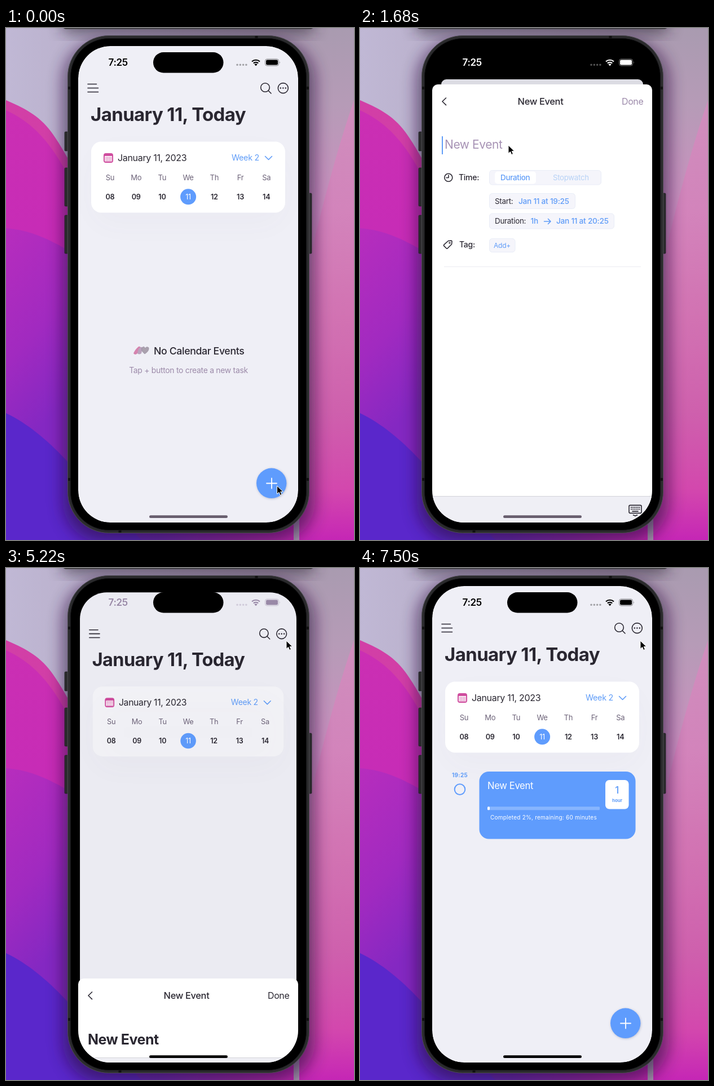
An HTML page that plays this animation: 617 px wide and 908 px high, repeating every 7560 ms.

```html
<!DOCTYPE html>
<html lang="en">
<head>
<meta charset="utf-8">
<title>Calendar: new event</title>
<style>
  html, body { margin: 0; width: 100%; height: 100%; overflow: hidden; background: #000; }
  svg { display: block; width: 100%; height: 100%; }
  text { font-family: Inter, Roboto, "Liberation Sans", sans-serif; letter-spacing: -.02em; fill: #2a2731; }
  .mid { text-anchor: middle; }
  .line { fill: none; stroke: #2a2731; stroke-width: 1.6; stroke-linecap: round; stroke-linejoin: round; }
  .pill { fill: #f5f5fb; stroke: #e9edf7; }
  .m { font-weight: 500; }
  text.blue { fill: #5f9cf8; }
  text.white { fill: #fff; }
  #typed { white-space: pre; }
</style>
</head>
<body>
<svg viewBox="0 0 617 908">
  <defs>
    <linearGradient id="sky"><stop stop-color="#c0b8d5"/><stop offset=".84" stop-color="#a99bb0"/></linearGradient>
    <linearGradient id="right" x2="0" y2="1">
      <stop stop-color="#a99bb0"/><stop offset=".15" stop-color="#b69bb7"/><stop offset=".36" stop-color="#cb8fbf"/>
      <stop offset=".52" stop-color="#cd79b4"/><stop offset=".75" stop-color="#cc60ab"/>
      <stop offset=".9" stop-color="#d346ad"/><stop offset="1" stop-color="#c526b5"/>
    </linearGradient>
    <linearGradient id="ray" x2="0" y2="1">
      <stop stop-color="#d98ac0" stop-opacity=".75"/><stop offset=".5" stop-color="#d670b2" stop-opacity=".5"/>
      <stop offset="1" stop-color="#d24ab0" stop-opacity="0"/>
    </linearGradient>
    <linearGradient id="wave" x2="0" y2="1"><stop stop-color="#d23fa6"/><stop offset="1" stop-color="#cf35b0"/></linearGradient>
    <linearGradient id="deep" x2="0" y2="1"><stop stop-color="#cb2fb3"/><stop offset=".35" stop-color="#c62bb7"/><stop offset="1" stop-color="#a22cc0"/></linearGradient>
    <linearGradient id="violet" x2=".3" y2="1"><stop stop-color="#b72dbd"/><stop offset=".4" stop-color="#a12ac0"/><stop offset=".7" stop-color="#8428c2"/></linearGradient>
    <linearGradient id="floor"><stop stop-color="#5827cb"/><stop offset=".4" stop-color="#6a28b4"/><stop offset=".75" stop-color="#9c25a9"/><stop offset="1" stop-color="#c926b4"/></linearGradient>
    <filter id="blur" x="-30%" y="-30%" width="160%" height="160%"><feGaussianBlur stdDeviation="14"/></filter>
    <filter id="wide" x="-30%" y="-60%" width="160%" height="220%"><feGaussianBlur stdDeviation="24"/></filter>
    <filter id="near" x="-30%" y="-30%" width="160%" height="160%"><feGaussianBlur stdDeviation="2"/></filter>
    <clipPath id="screen"><rect x="128" y="32" width="390" height="845" rx="57"/></clipPath>
  </defs>

  <!-- wallpaper -->
  <rect width="617" height="908" fill="url(#sky)"/>
  <rect x="520" width="97" height="908" fill="url(#right)"/>
  <path d="M617 128Q580 235 542 395V908H617Z" fill="url(#ray)"/>
  <path d="M0 128C30 141 58 154 80 184S112 238 150 300V908H0Z" fill="url(#wave)"/>
  <path d="M0 146C40 164 75 195 108 258L150 330V908H0Z" fill="url(#deep)"/>
  <path d="M0 355C40 358 80 372 150 420V908H0Z" fill="url(#violet)"/>
  <rect x="110" y="880" width="400" height="28" fill="url(#floor)"/>
  <path d="M0 683C40 702 78 735 110 770L240 908H0Z" fill="#5a27cb"/>
  <rect x="101" y="-40" width="444" height="48" fill="#2a2430" opacity=".65" filter="url(#blur)"/>
  <rect x="101" y="-10" width="444" height="12" rx="5" fill="#454348"/>
  <rect x="101" y="22" width="447" height="890" rx="72" fill="#2b0a3c" opacity=".6" filter="url(#blur)"/>

  <!-- phone -->
  <g fill="#2b2b2d" stroke="#17171a" stroke-width=".6">
    <rect x="104" y="184" width="8" height="34" rx="1.5"/>
    <rect x="104" y="248" width="8" height="68" rx="1.5"/>
    <rect x="104" y="332" width="8" height="68" rx="1.5"/>
    <rect x="534" y="293" width="8" height="107" rx="1.5"/>
  </g>
  <rect x="109.5" y="13.5" width="428" height="882" rx="73" fill="#2a2a2c" stroke="#4c4b50"/>
  <path d="M110 106.500h5M532 106.500h5M110 800.500h5M532 800.500h5M444 14v5M202 890v5" stroke="#111" stroke-width="5"/>
  <rect x="114.500" y="18.500" width="418" height="872" rx="68" fill="#000" stroke="#151517"/>

  <g clip-path="url(#screen)">
    <g id="page">
      <rect class="sheetback" x="128" y="32" width="390" height="845" fill="#efeff6"/>
      <path class="line" d="M145 99.500h15.500M145 106.500h18.500M145 113.500h18.500"/>
      <path class="line" d="M465.500 111.500l4.500 4.500"/><circle class="line" cx="459.500" cy="105.500" r="7.800"/>
      <circle class="line" cx="491.300" cy="106.600" r="9"/>
      <path d="M486.800 106.600h.01M491.300 106.600h.01M495.800 106.600h.01" stroke="#2a2731" stroke-width="2.500" stroke-linecap="round"/>
      <text x="150" y="164.500" font-size="33" font-weight="700" style="letter-spacing:-.62px">January 11, Today</text>

      <rect x="151" y="216" width="344" height="136" rx="40" fill="#55506e" opacity=".025" filter="url(#wide)"/>
      <rect id="card" x="151" y="201.500" width="344" height="126" rx="18" fill="#fff"/>
      <rect x="173" y="222" width="17" height="17" rx="4" fill="#cf4c9e"/>
      <path d="M175 227h13v9.500h-13z" fill="#fff"/>
      <path d="M176.500 229.300h11M176.500 232h11M176.500 234.700h11" stroke="#cf4c9e" stroke-width="1.300" stroke-dasharray="1.800 1.100"/>
      <text x="198" y="235.500" font-size="16">January 11, 2023</text>
      <text class="blue" x="400" y="235" font-size="14.300">Week 2</text>
      <path class="line" d="M459.500 227.500l6 6 6-6" style="stroke:#5f9cf8"/>
      <g id="week" class="mid"></g>

      <g id="empty">
        <path d="M226 577q3-7 9-12 4-1 3 3l-5 9q-4 4-7 0z" fill="#d583ae"/>
        <path d="M233 577q1-8 5-11 4-1 4 3l-2 8q-4 3-7 0z" fill="#b9a3bd"/>
        <path d="M241 567q4-4 5.500 1 3-4 6.500-1 1 6-7 11-7-5-5-11z" fill="#aaa1ae" stroke="#8e8496" stroke-width=".6"/>
        <text class="m" x="262" y="578.500" font-size="17.700">No Calendar Events</text>
        <text class="mid" x="323.500" y="611.500" font-size="13.900" style="fill:#9c8aa9">Tap + button to create a new task</text>
      </g>

      <g id="event">
        <text class="mid blue" x="177" y="370.500" font-size="10" font-weight="700" style="letter-spacing:.3px">19:25</text>
        <circle cx="177" cy="392.600" r="9.300" fill="none" stroke="#5f9cfd" stroke-width="2"/>
        <rect x="211.500" y="361" width="277" height="119.500" rx="17" fill="#5f9cfd"/>
        <text class="white" x="226" y="392" font-size="16.600">New Event</text>
        <rect x="226" y="423.300" width="199" height="6" rx="1.500" fill="#fff" opacity=".25"/>
        <rect x="226" y="423.300" width="4" height="6" rx="1.500" fill="#fff"/>
        <text class="white" x="231" y="445.600" font-size="10" style="letter-spacing:.23px">Completed 2%, remaining: 60 minutes</text>
        <rect x="435" y="376" width="41.500" height="51.500" rx="7" fill="#fff"/>
        <text class="mid blue m" x="455.700" y="400" font-size="17">1</text>
        <text class="mid blue" x="456" y="414.500" font-size="8" font-weight="700" style="letter-spacing:0">hour</text>
      </g>

      <circle cx="471.300" cy="808.300" r="26.500" fill="#54618f" opacity=".4" filter="url(#near)"/>
      <circle cx="470.700" cy="807.300" r="26.700" fill="#5f9cfd"/>
      <path d="M462 807.500h18M471 798.500v18" stroke="#fff" stroke-width="1.800" stroke-linecap="round"/>
      <rect id="dim" class="sheetback" x="128" y="32" width="390" height="845"/>
    </g>

    <rect x="261" y="43" width="124.500" height="36.500" rx="18.200"/>
    <text id="clock" class="mid" x="198.700" y="67" font-size="17" font-weight="600">7:25</text>
    <g id="status">
      <path d="M410 65.300h.01M415.300 65.300h.01M420.600 65.300h.01M425.900 65.300h.01" stroke="currentColor" stroke-opacity=".33" stroke-width="3.600" stroke-linecap="round"/>
      <path d="M436 59.500a10.300 10.300 0 0 1 14 0M438.800 62.500a6.200 6.200 0 0 1 8.400 0" fill="none" stroke="currentColor" stroke-width="2.200"/>
      <path d="M443 67.300l-2.600-2.800a3.800 3.800 0 0 1 5.200 0z" fill="currentColor"/>
      <rect x="459.500" y="55" width="24" height="12" rx="3.600" fill="none" stroke="currentColor" stroke-opacity=".45"/>
      <rect x="461" y="56.500" width="21" height="9" rx="2.300" fill="currentColor"/>
      <path d="M485 59.300q1.600 1.700 0 3.600z" fill="currentColor" opacity=".5"/>
    </g>

    <g id="sheet">
      <rect x="128" y="100" width="390" height="860" rx="10" fill="#fff"/>
      <path class="line" d="M152.500 124l-6.500 6.300 6.500 6.300"/>
      <text class="mid m" x="320" y="136" font-size="16.400">New Event</text>
      <text id="done" x="464" y="136" font-size="15.900">Done</text>
      <text id="hint" x="150" y="214.300" font-size="21" style="fill:#a793b5">New Event</text>
      <text id="typed" x="145" y="217" font-size="25" font-weight="700"></text>
      <rect id="caret" y="192" width="2" height="32" fill="#5f9cf8"/>

      <circle class="line" cx="156.800" cy="265.300" r="7"/><path class="line" d="M157 261v4.500h-4"/>
      <text class="m" x="175" y="270.300" font-size="14">Time:</text>
      <rect class="pill" x="229.500" y="252.500" width="198" height="25.500" rx="5"/>
      <rect x="239" y="254.500" width="73" height="22" rx="5" fill="#fff"/>
      <text class="blue m" x="249" y="270" font-size="13.400">Duration</text>
      <text x="342" y="270" font-size="13.200" style="fill:#b7d2f6">Stopwatch</text>
      <rect class="pill" x="229.500" y="293.500" width="152" height="27" rx="5"/>
      <text x="239" y="312" font-size="13.400">Start:</text>
      <text class="blue m" x="281" y="312" font-size="13.700">Jan 11 at 19:25</text>
      <rect class="pill" x="229.500" y="329" width="221" height="27" rx="5"/>
      <text x="239" y="347.300" font-size="13.400">Duration:</text>
      <text class="blue m" x="302.500" y="347.300" font-size="13.700">1h</text>
      <path class="line" d="M326.500 343h11.500M333.500 338.500l4.500 4.500-4.500 4.500" style="stroke:#5f9cf8"/>
      <text class="blue m" x="348" y="347.300" font-size="13.700">Jan 11 at 20:25</text>
      <path class="line" d="M156.500 377.500l5-.5q1.500 0 1.500 1.500l-.5 5-7.300 7.300q-1 .8-2 0l-4.400-4.400q-.8-1 0-2z"/>
      <circle class="line" cx="159" cy="381" r="1.200" style="stroke-width:1.100"/>
      <text class="m" x="176" y="389" font-size="14">Tag:</text>
      <rect class="pill" x="229.500" y="373.500" width="45.500" height="24" rx="5"/>
      <text class="blue" x="237" y="390" font-size="12">Add+</text>
      <path d="M149 423.300h349" stroke="#ebebf0"/>
    </g>

    <g id="bar">
      <rect x="128" y="828" width="390" height="60" fill="#efeff5"/>
      <path d="M128 828.200h390" stroke="#d3d3d9"/>
      <rect class="line" x="477" y="844" width="22" height="14" rx="2"/>
      <path d="M480 847.700h16.500M480 851h16.500" stroke="#2a2731" stroke-width="1.800" stroke-dasharray="1.900 1"/>
      <path class="line" d="M483 854.800h10M484.500 861.500l3.500 1.500 3.500-1.500"/>
    </g>
    <rect id="home" x="254" y="864.300" width="139" height="4.800" rx="2.400"/>
  </g>

  <path id="mouse" d="M0 0V14.500L3.500 11.300 5.700 16.500 8.400 15.400 6.200 10.400H10.800Z" stroke="#fff" stroke-width="1"/>
</svg>
<script>
const LOOP = 7560, OPEN = 60, FOCUS = 1380, CLOSE = 4916;
const $ = id => document.getElementById(id);
const clamp = v => Math.max(0, Math.min(1, v));
const ramp = (t, a, b) => clamp((t - a) / (b - a));
const lerp = (a, b, k) => a + (b - a) * k;
const mix = (a, b, k) => `rgb(${a.map((v, i) => Math.round(lerp(v, b[i], k)))})`;
const shift = (id, x, y) => $(id).setAttribute('transform', `translate(${x} ${y})`);
const show = (id, k) => $(id).setAttribute('opacity', +k);

// critically damped spring, 0 to 1
const spring = (ms, w) => {
  const x = Math.max(0, ms) / 1000 * w;
  return 1 - (1 + x) * Math.exp(-x);
};

const easeIn = k => k * k, easeOut = k => k * (2 - k), smooth = k => k * k * (3 - 2 * k);
const moves = [ // start, end, x, y, easing
  [240, 660, 359, 306, easeIn],
  [660, 900, 263, 208, easeOut],
  [3960, 4500, 497, 129, smooth]
];
const keyTimes = [2220, 2400, 2580, 2760, 3000, 3180, 3360, 3540, 3720];

'Su Mo Tu We Th Fr Sa'.split(' ').forEach((day, i) => {
  const x = 184.5 + 46.2 * i, on = i === 3;
  $('week').innerHTML += (on ? `<circle cx="${x}" cy="299.300" r="14" fill="#5f9cfd"/>` : '') +
    `<text x="${x}" y="269.700" font-size="13" style="fill:#6d6379">${day}</text>` +
    `<text x="${x}" y="304" font-size="12.700" font-weight="${on ? 400 : 600}" class="${on ? 'white' : ''}">${String(8 + i).padStart(2, '0')}</text>`;
});

function draw(t) {
  const closing = spring(t - CLOSE, 10);
  const p = spring(t - OPEN, 16) * (1 - closing);

  $('page').setAttribute('transform',
    `translate(323 ${32 + 59 * p}) scale(${1 - .082 * p}) translate(-323 -32)`);
  document.querySelectorAll('.sheetback').forEach(r => r.setAttribute('rx', lerp(57, 10, p)));
  show('dim', .08 * p);
  show('card', t < CLOSE ? 1 : ramp(t, 5040, 5460));
  show('empty', t < CLOSE);
  show('event', ramp(t, 5400, 5700));

  const mauve = [160, 143, 174];
  const ink = p < .2 ? mix([0, 0, 0], mauve, p / .2) : mix(mauve, [255, 255, 255], (p - .2) / .8);
  $('clock').style.fill = $('status').style.color = ink;
  $('home').setAttribute('fill', t < 2400 ? '#685e6e' : '#000');

  shift('sheet', 0, 777 * (1 - p));
  shift('bar', 0, 50 * (1 - spring(t - FOCUS, 16) * (1 - closing)));

  const count = keyTimes.filter(k => k <= t).length;
  $('typed').textContent = 'New Event'.slice(0, count);
  show('hint', !count);
  $('done').style.fill = count ? '#2a2731' : '#9d8bab';
  show('caret', t >= FOCUS && t < CLOSE);
  $('caret').setAttribute('x', 145 + (count ? $('typed').getComputedTextLength() : 0));

  let x = 480.5, y = 812;
  for (const [a, b, toX, toY, ease] of moves) {
    const k = ease(ramp(t, a, b));
    x = lerp(x, toX, k);
    y = lerp(y, toY, k);
  }
  shift('mouse', x, y);
}

const start = performance.now();
function tick() {
  draw((performance.now() - start) % LOOP);
  requestAnimationFrame(tick);
}
tick();
</script>
</body>
</html>
```
